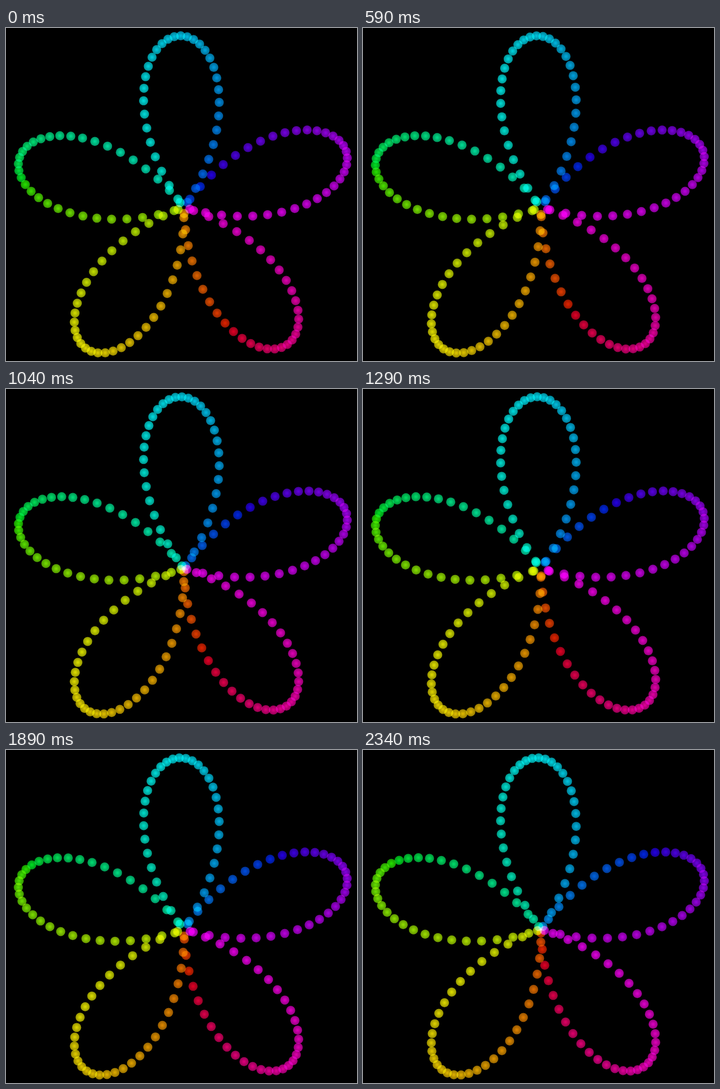
Recreate the animation shown at these times as an HTML page with a canvas. Size 768x729 px, loop 2.37 s.

```html
<!DOCTYPE html>
<html>
<head>
<meta charset="utf-8">
<style>
  html, body { margin: 0; height: 100%; overflow: hidden; background: #000; }
  canvas { display: block; }
</style>
</head>
<body>
<canvas width="768" height="729"></canvas>
<script>
const ctx = document.querySelector('canvas').getContext('2d');
const LOOP = 2370, COUNT = 165, STEP = 360 / COUNT;
const CX = 389.2, CY = 392.8, SIZE = 375.8, DOT = 10;
const AXIS = 91.33;       // direction of the top petal, degrees
const FIRST = 91.05;      // angle of the first dot at time 0
const RED = 290.6;        // angle at which the hue starts
const SPEED = 1 / 150;    // degrees per ms, clockwise
const rad = deg => deg * Math.PI / 180;

// One channel of a fully saturated hue, mixed in linear light
function channel(hue, offset) {
  const k = (((hue + offset) % 360) + 360) % 360 / 60;
  const linear = Math.max(0, Math.min(1, Math.abs(k - 3) - 1));
  return Math.pow(linear, 1 / 2.2);
}

// Bright core fading to a darker rim
function dotFill(hue) {
  const rgb = [0, 240, 120].map(offset => channel(hue, offset));
  const shade = level => `rgb(${rgb.map(c => Math.round(c * level))})`;
  const fill = ctx.createRadialGradient(0, 0, 0, 0, 0, DOT);
  fill.addColorStop(0, shade(224));
  fill.addColorStop(0.4, shade(194));
  fill.addColorStop(1, shade(150));
  return fill;
}

const dots = Array.from({ length: COUNT }, (_, i) => {
  const angle = FIRST + i * STEP;
  return { angle, fill: dotFill(RED - angle) };
});

// The picture advances every 30 ms
function snap(t) {
  const start = t < 1340 ? 20 : 30;
  return Math.max(0, Math.floor((t - start) / 30) * 30 + start);
}

function draw(t) {
  ctx.setTransform(1, 0, 0, 1, 0, 0);
  ctx.globalCompositeOperation = 'source-over';
  ctx.fillStyle = '#000';
  ctx.fillRect(0, 0, 768, 729);
  ctx.globalCompositeOperation = 'screen';
  for (const { angle, fill } of dots) {
    const a = angle - t * SPEED;
    const r = SIZE * Math.abs(Math.cos(rad(2.5 * (a - AXIS))));
    ctx.setTransform(1, 0, 0, 1, CX + r * Math.cos(rad(a)), CY - r * Math.sin(rad(a)));
    ctx.fillStyle = fill;
    ctx.beginPath();
    ctx.arc(0, 0, DOT, 0, 2 * Math.PI);
    ctx.fill();
  }
}

const begin = performance.now();
function tick() {
  draw(snap((performance.now() - begin) % LOOP));
  requestAnimationFrame(tick);
}
tick();
</script>
</body>
</html>
```
